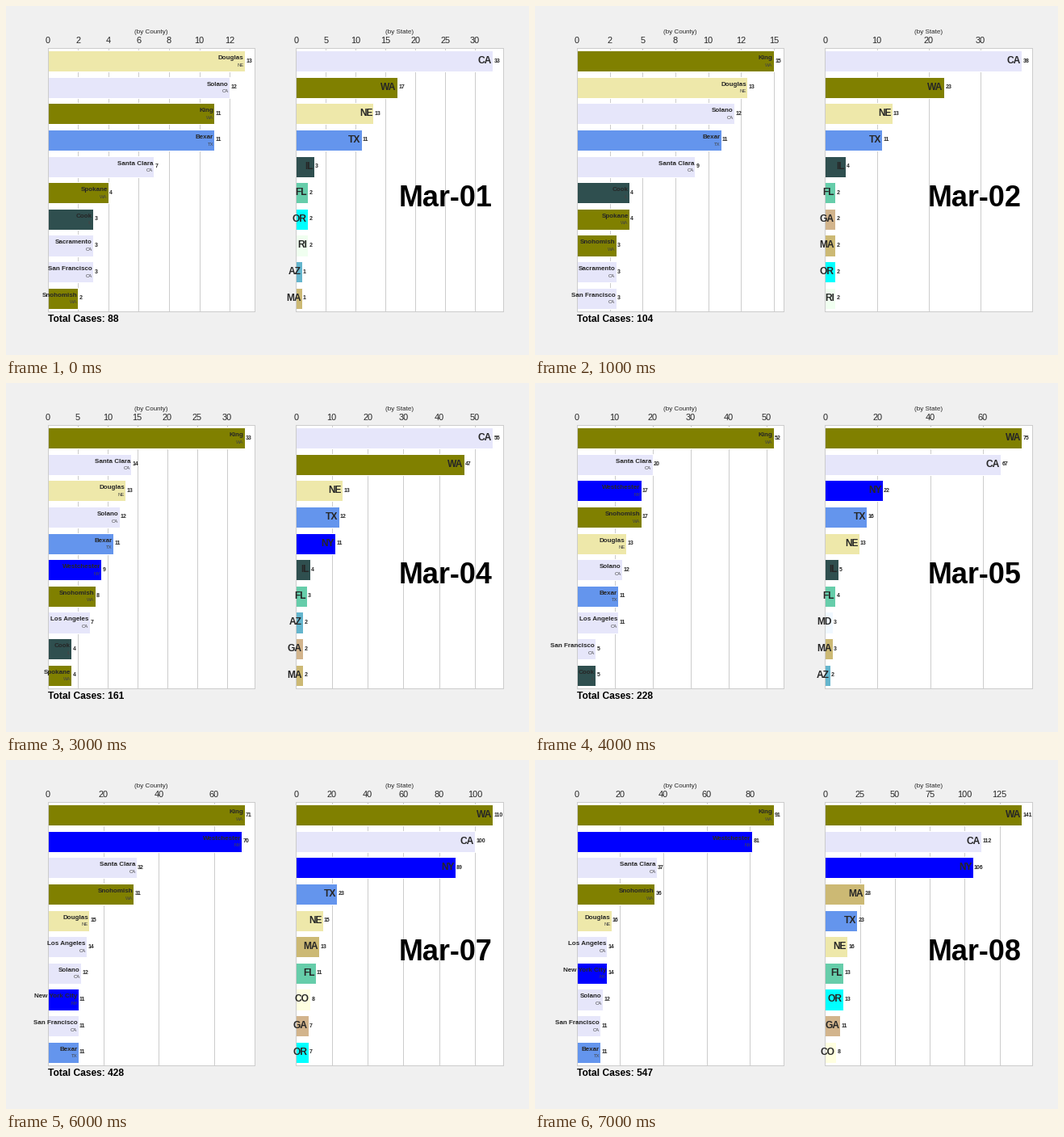
These frames come from a looping animation (648x432 px, 8000 ms). A matplotlib script:

```python
import matplotlib.pyplot as plt
from matplotlib.animation import FuncAnimation

plt.rcParams.update({
    "font.family": "Liberation Sans",
    "text.color": ".15",
    "axes.labelcolor": ".15",
    "axes.edgecolor": ".8",
    "axes.linewidth": 1,
    "axes.axisbelow": True,
    "grid.color": ".8",
    "grid.linewidth": 1,
    "xtick.color": ".15",
    "xtick.labelsize": 11,
    "xtick.major.size": 0,
    "xtick.major.pad": 3.5,
    "xtick.bottom": False,
    "xtick.labelbottom": False,
    "xtick.labeltop": True,
})

COLORS = {
    "CA": "lavender", "WA": "olive", "NE": "palegoldenrod",
    "TX": "cornflowerblue", "IL": "darkslategray", "NY": "blue",
    "FL": "mediumaquamarine", "OR": "cyan", "RI": "honeydew",
    "AZ": "#64b5cd", "MA": "#ccb974", "GA": "tan", "MD": "aliceblue",
    "CO": "lightyellow", "NJ": "gray", "NH": "lightgray",
}

COUNTIES = {
    "CA": ["Solano", "Santa Clara", "Sacramento", "San Francisco", "Los Angeles"],
    "WA": ["King", "Spokane", "Snohomish"],
    "NE": ["Douglas"],
    "TX": ["Bexar", "Harris"],
    "IL": ["Cook"],
    "NY": ["Westchester", "New York City"],
}
STATE_OF = {name: state for state, names in COUNTIES.items() for name in names}

# One entry per day: total, top counties, top states
DAYS = [
    (88,
     "Douglas 13, Solano 12, King 11, Bexar 11, Santa Clara 7, Spokane 4, "
     "Cook 3, Sacramento 3, San Francisco 3, Snohomish 2",
     "CA 33, WA 17, NE 13, TX 11, IL 3, FL 2, OR 2, RI 2, AZ 1, MA 1"),
    (104,
     "King 15, Douglas 13, Solano 12, Bexar 11, Santa Clara 9, Cook 4, "
     "Spokane 4, Snohomish 3, Sacramento 3, San Francisco 3",
     "CA 38, WA 23, NE 13, TX 11, IL 4, FL 2, GA 2, MA 2, OR 2, RI 2"),
    (125,
     "King 22, Douglas 13, Solano 12, Santa Clara 11, Bexar 11, Snohomish 5, "
     "Cook 4, Spokane 4, Sacramento 3, San Francisco 3",
     "CA 45, WA 32, NE 13, TX 11, IL 4, FL 3, AZ 2, GA 2, MA 2, NH 2"),
    (161,
     "King 33, Santa Clara 14, Douglas 13, Solano 12, Bexar 11, Westchester 9, "
     "Snohomish 8, Los Angeles 7, Cook 4, Spokane 4",
     "CA 55, WA 47, NE 13, TX 12, NY 11, IL 4, FL 3, AZ 2, GA 2, MA 2"),
    (228,
     "King 52, Santa Clara 20, Westchester 17, Snohomish 17, Douglas 13, "
     "Solano 12, Bexar 11, Los Angeles 11, San Francisco 5, Cook 5",
     "WA 75, CA 67, NY 22, TX 16, NE 13, IL 5, FL 4, MD 3, MA 3, AZ 2"),
    (311,
     "King 59, Westchester 33, Santa Clara 24, Snohomish 18, Douglas 14, "
     "Los Angeles 13, Solano 12, Bexar 11, Cook 6, Harris 5",
     "WA 86, CA 81, NY 44, TX 19, NE 14, CO 8, MA 8, FL 7, IL 6, NJ 4"),
    (428,
     "King 71, Westchester 70, Santa Clara 32, Snohomish 31, Douglas 15, "
     "Los Angeles 14, Solano 12, New York City 11, San Francisco 11, Bexar 11",
     "WA 110, CA 100, NY 89, TX 23, NE 15, MA 13, FL 11, CO 8, GA 7, OR 7"),
    (547,
     "King 91, Westchester 81, Santa Clara 37, Snohomish 36, Douglas 16, "
     "Los Angeles 14, New York City 14, Solano 12, San Francisco 11, Bexar 11",
     "WA 141, CA 112, NY 106, MA 28, TX 23, NE 16, FL 13, OR 13, GA 11, CO 8"),
]


def parse(text):
    pairs = [item.rsplit(" ", 1) for item in text.split(", ")]
    return [(name, int(value)) for name, value in pairs]


def draw_bars(ax, rows, title, label):
    """Ranked horizontal bars; label(x, y, name) writes the name in the bar."""
    ax.clear()
    top = rows[0][1]
    dx = top / 200
    for y, (name, value) in enumerate(rows):
        color = COLORS[STATE_OF.get(name, name)]
        ax.barh(y, value, height=0.8, color=color, edgecolor="white", linewidth=1)
        label(value - dx, y, name)
        ax.text(value + dx, y, f"{value:,.0f}", size=7, weight="bold",
                ha="left", va="center")
    ax.set_xlim(0, top * 1.05)
    ax.set_ylim(len(rows) - 0.5, -0.5)
    ax.set_yticks([])
    ax.grid(axis="x")
    ax.xaxis.set_major_formatter("{x:,.0f}")
    ax.xaxis.set_label_position("top")
    ax.set_xlabel(title, size=8)


def county_label(x, y, name):
    left.text(x, y, name, size=8, weight="bold", ha="right", va="bottom")
    left.text(x, y + 0.2, STATE_OF[name], size=6, color="#444444",
              ha="right", va="baseline")


def state_label(x, y, name):
    right.text(x, y, name, size=12, weight="bold", ha="right", va="center")


def draw(day):
    total, counties, states = DAYS[day]
    draw_bars(left, parse(counties), "(by County)", county_label)
    draw_bars(right, parse(states), "(by State)", state_label)
    left.text(0, -0.04, f"Total Cases: {total}", transform=left.transAxes,
              size=12, weight="bold", color="black")
    right.text(0.95, 0.4, f"Mar-{day + 1:02d}", transform=right.transAxes,
               size=36, weight="bold", color="black", ha="right")


fig, (left, right) = plt.subplots(1, 2, figsize=(9, 6), dpi=72, facecolor="#f0f0f0")
fig.subplots_adjust(left=0.08, right=0.95, top=0.88, bottom=0.125, wspace=0.2)

anim = FuncAnimation(fig, draw, frames=len(DAYS), interval=1000, repeat=True)
plt.show()
```
